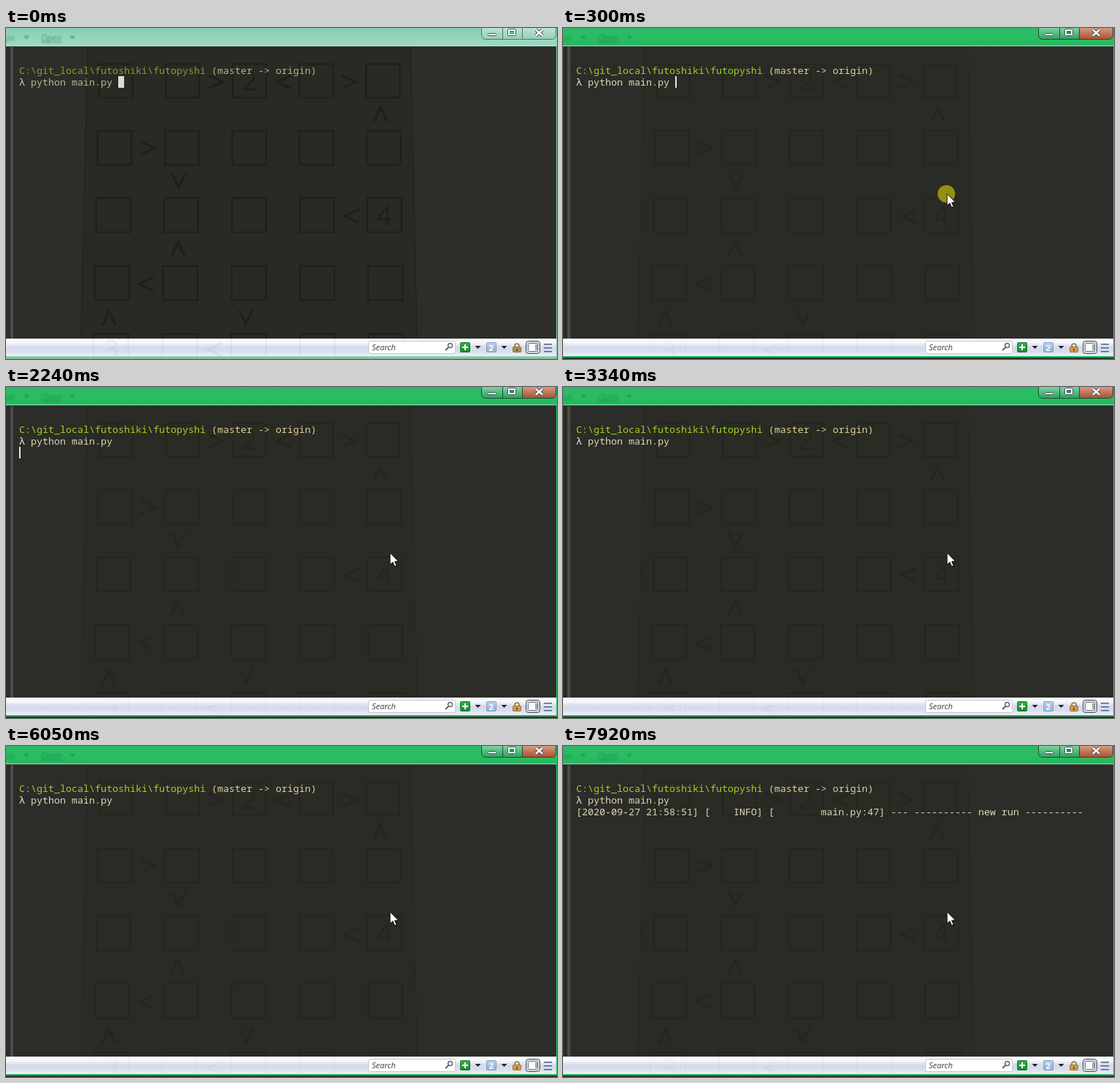
Recreate the animation shown at these times as an HTML page with a canvas. Size 756 by 454 pixels, loop 8000 ms.

```html
<!DOCTYPE html>
<html lang="en">
<head>
<meta charset="utf-8">
<title>Terminal</title>
<style>
html, body { margin: 0; width: 756px; height: 454px; overflow: hidden; background: #2b2b27; }
canvas { display: block; }
</style>
</head>
<body>
<canvas id="stage" width="756" height="454"></canvas>
<script>
const ctx = document.getElementById('stage').getContext('2d');
const LOOP = 8000;
const MONO = '13.333px "Noto Sans Mono", "DejaVu Sans Mono", monospace';

const inactive = {
  titleTop: '#86ceb0', titleMid: '#95d5bb', titleEnd: '#9cd9c1', rim: '#c0eedb', edge: '#86cfae',
  bg: '#2d2d29', panel: '#292a24', ink: '#20201b', path: '#7da51e', branch: '#bcae86', text: '#b9b699',
  menu: 'rgba(38,112,86,.6)', button: ['#b9e4d3', '#94cdb7'], close: ['#b9e4d3', '#94cdb7'],
  border: '#56796c', icon: '#ffffff', ghost: 0.05, lock: '#a98d4c', frame: '#8fd0af'
};
const active = {
  titleTop: '#2fb767', titleMid: '#2abd63', titleEnd: '#27b85f', rim: '#8fe3b2', edge: '#2cc068',
  bg: '#2c2c28', panel: '#2a2b25', ink: '#252620', path: '#9fd127', branch: '#e2cf93', text: '#dfd6b8',
  menu: 'rgba(10,100,48,.42)', button: ['#7cd3a0', '#2b9e5c'], close: ['#d59a83', '#ab4c2c'],
  border: '#1c5234', icon: '#ffffff', ghost: 0.025, lock: '#d49a48', frame: '#27b35d'
};

function rect(x, y, w, h, fill) {
  ctx.fillStyle = fill;
  ctx.fillRect(x, y, w, h);
}

function text(str, x, y, fill, font = MONO) {
  ctx.font = font;
  ctx.fillStyle = fill;
  ctx.fillText(str, x, y);
}

function trace(points, closed) {
  ctx.beginPath();
  points.forEach(([x, y]) => ctx.lineTo(x, y));
  if (closed) ctx.closePath();
}

function line(points, color, width) {
  trace(points);
  ctx.strokeStyle = color;
  ctx.lineWidth = width;
  ctx.stroke();
}

function shape(points, color) {
  trace(points, true);
  ctx.fillStyle = color;
  ctx.fill();
}

function box(x, y, w, h, r, fill, stroke) {
  ctx.beginPath();
  ctx.roundRect(x + .5, y + .5, w - 1, h - 1, r);
  ctx.fillStyle = fill;
  ctx.fill();
  ctx.strokeStyle = stroke;
  ctx.lineWidth = 1;
  ctx.stroke();
}

function fade(y0, y1, ...colors) {
  const g = ctx.createLinearGradient(0, y0, 0, y1);
  colors.forEach((c, i) => g.addColorStop(i / (colors.length - 1), c));
  return g;
}

const signs = [
  ['>', 288, 74], ['<', 381, 74], ['>', 471, 74], ['^', 514, 118], ['>', 195, 165],
  ['v', 237, 210], ['<', 474, 258], ['^', 236, 303], ['<', 192, 351],
  ['^', 141, 398], ['v', 329, 397], ['<', 286, 441]
];

function drawSign(kind, x, y, color) {
  ctx.save();
  ctx.translate(x, y);
  ctx.rotate('>v<^'.indexOf(kind) * Math.PI / 2);
  line([[-10, -9], [9, 0], [-10, 9]], color, 3.5);
  ctx.restore();
}

// Slightly tapered number grid behind the terminal text
function drawPuzzle(color) {
  ctx.strokeStyle = color;
  for (let r = 0; r < 5; r++) {
    const size = 46 + r * .4, y = 72.5 + r * 91.4 + r * r * .35;
    for (let c = 0; c < 5; c++) {
      const x = 334 - r * .3 + (c - 2) * (91.6 + r * .7);
      ctx.lineWidth = 2.2;
      ctx.strokeStyle = color;
      ctx.strokeRect(x - size / 2, y - size / 2, size, size);
    }
  }
  signs.forEach(([kind, x, y]) => drawSign(kind, x, y, color));
  ctx.textAlign = 'center';
  [['2', 334, 86], ['4', 519, 270], ['3', 145, 454]].forEach(([n, x, y]) =>
    text(n, x, y, color, '36px "Noto Sans", "Open Sans", sans-serif'));
  ctx.textAlign = 'left';
}

function drawTitle(p) {
  rect(0, 0, 756, 24, fade(0, 24, p.titleTop, p.titleMid, p.titleEnd));
  ctx.filter = 'blur(1px)';
  const font = 'italic 12px "Open Sans", sans-serif';
  text('pn', -2, 18, p.menu, font);
  text('Open', 48, 18, p.menu, font);
  rect(48, 19, 28, 1, p.menu);
  [28, 91].forEach(x => shape([[x - 4, 11], [x + 4, 11], [x, 15]], p.menu));
  ctx.filter = 'none';
  rect(0, 24, 756, 1, p.rim);
  rect(0, 25, 756, 1, '#34443a');

  box(652, -6, 30, 22, [0, 0, 0, 5], fade(0, 16, ...p.button), p.border);
  box(681, -6, 28, 22, 0, fade(0, 16, ...p.button), p.border);
  box(708, -6, 47, 22, [0, 0, 5, 0], fade(0, 16, ...p.close), p.border);
  const dark = '#45525a';
  box(661, 7, 12, 4, 1, p.icon, dark);
  box(688, 1, 12, 10, 1, p.icon, dark);
  box(691, 4, 6, 4, 0, p.button[1], dark);
  for (const [color, width] of [[dark, 4.4], [p.icon, 2.4]]) {
    line([[727, 2.5], [736, 10.5]], color, width);
    line([[736, 2.5], [727, 10.5]], color, width);
  }
}

function drawStatus(p) {
  rect(0, 426, 756, 24, fade(426, 450, '#ffffff', '#f3f5fb', '#d5daea', '#d9deee', '#f0f3f9'));
  ctx.save();
  ctx.beginPath();
  ctx.rect(0, 426, 490, 24);
  ctx.clip();
  drawPuzzle(`rgba(40,40,60,${p.ghost})`);
  ctx.restore();
  rect(0, 450, 756, 2, p.frame);
  rect(0, 452, 756, 2, p === active ? '#25352b' : '#89b79f');

  box(497, 429, 120, 18, 2, '#ffffff', '#c3c7d0');
  text('Search', 502, 442, '#3c3c3c', 'italic 11px "Open Sans", sans-serif');
  ctx.beginPath();
  ctx.arc(609.5, 435.5, 3, 0, 7);
  ctx.strokeStyle = '#59616d';
  ctx.lineWidth = 1.4;
  ctx.stroke();
  line([[607, 438], [603, 442]], '#59616d', 2);

  box(623, 431, 14, 14, 1, fade(431, 445, '#3cb04a', '#168a2c'), '#147a28');
  rect(629, 434, 2, 8, '#fff');
  rect(626, 437, 8, 2, '#fff');
  [647.5, 683.5].forEach(x => shape([[x - 4, 436], [x + 4, 436], [x, 440]], '#222'));
  box(659, 431, 14, 14, 1, fade(431, 445, '#c0d4ee', '#8eaed8'), '#7d9cc6');
  text('2', 662.5, 442.5, '#fff', 'bold 11px "Open Sans", sans-serif');

  ctx.beginPath();
  ctx.arc(701, 436, 3, Math.PI, 0);
  ctx.lineTo(704, 439);
  ctx.moveTo(698, 436);
  ctx.lineTo(698, 439);
  ctx.strokeStyle = '#94793f';
  ctx.lineWidth = 1.7;
  ctx.stroke();
  box(695, 437, 12, 8, 1, p.lock, '#967333');
  rect(700, 440, 2, 3, '#66502a');

  box(713, 429, 20, 18, 3, '#d3d8e0', '#4c525b');
  box(716, 432, 14, 12, 1, '#fbfcfd', '#6f7882');
  rect(726, 434, 3, 8, '#9fb3a6');
  [433, 438, 443].forEach(y => rect(738, y, 11, 1.5, '#46638f'));
}

function drawPointer(x, y) {
  ctx.save();
  ctx.translate(x, y);
  trace([[0, 0], [0, 16], [3.7, 12.7], [6.2, 18.5], [8.8, 17.4], [6.4, 11.8], [11.3, 11.5]], true);
  ctx.shadowColor = 'rgba(0,0,0,.5)';
  ctx.shadowBlur = 2;
  ctx.shadowOffsetX = ctx.shadowOffsetY = 1;
  ctx.fillStyle = '#fff';
  ctx.fill();
  ctx.shadowColor = 'transparent';
  ctx.strokeStyle = '#111';
  ctx.lineWidth = 1;
  ctx.stroke();
  ctx.restore();
}

function drawCaret(t) {
  const color = '#e6e6dc';
  if (t < 300) rect(154, 66, 8, 16, '#dcdcd3');
  else if (t < 620) rect(154, 66, 2, 16, color);
  else if (t < 7370) {
    if (Math.floor((t - 620) / 544) % 2 === 0) rect(18, 82, 2, 16, color);
  } else if (t < 7920) rect(18, 98, 2, 16, color);
}

function drawMouse(t) {
  if (t < 140) return;
  if (t < 240) return drawPointer(600, 314);
  if (t < 300) return drawPointer(553, 259);
  if (t < 380) {
    ctx.beginPath();
    ctx.arc(526, 227.5, 12, 0, 7);
    ctx.fillStyle = '#938f13';
    ctx.fill();
  }
  drawPointer(527, 227.5);
}

function draw(t) {
  const p = t < 300 ? inactive : active;
  rect(0, 0, 756, 454, p.bg);
  const sheet = [[112, 26], [555, 26], [564, 426], [103, 426]];
  shape(sheet, p.panel);
  line([sheet[0], sheet[3]], p.ink, 1);
  line([sheet[1], sheet[2]], p.ink, 1);
  drawPuzzle(p.ink);
  rect(6, 26, 4, 400, '#4b4b49');
  drawTitle(p);
  drawStatus(p);
  rect(755, 16, 1, 436, p.edge);

  text('C:\\git_local\\futoshiki\\futopyshi', 18, 63, p.path);
  text('(master -> origin)', 282, 63, p.branch);
  text('λ', 18, 79, p === active ? '#f0eee2' : '#d2d2c6');
  text('python main.py', 34, 79, p.text);
  if (t >= 7370) {
    text('[2020-09-27 21:58:51] [    INFO] [        main.py:47] --- ---------- new run ----------',
      18, 95, p.text);
  }
  drawCaret(t);
  drawMouse(t);
}

function tick() {
  draw(performance.now() % LOOP);
  requestAnimationFrame(tick);
}
tick();
</script>
</body>
</html>
```
